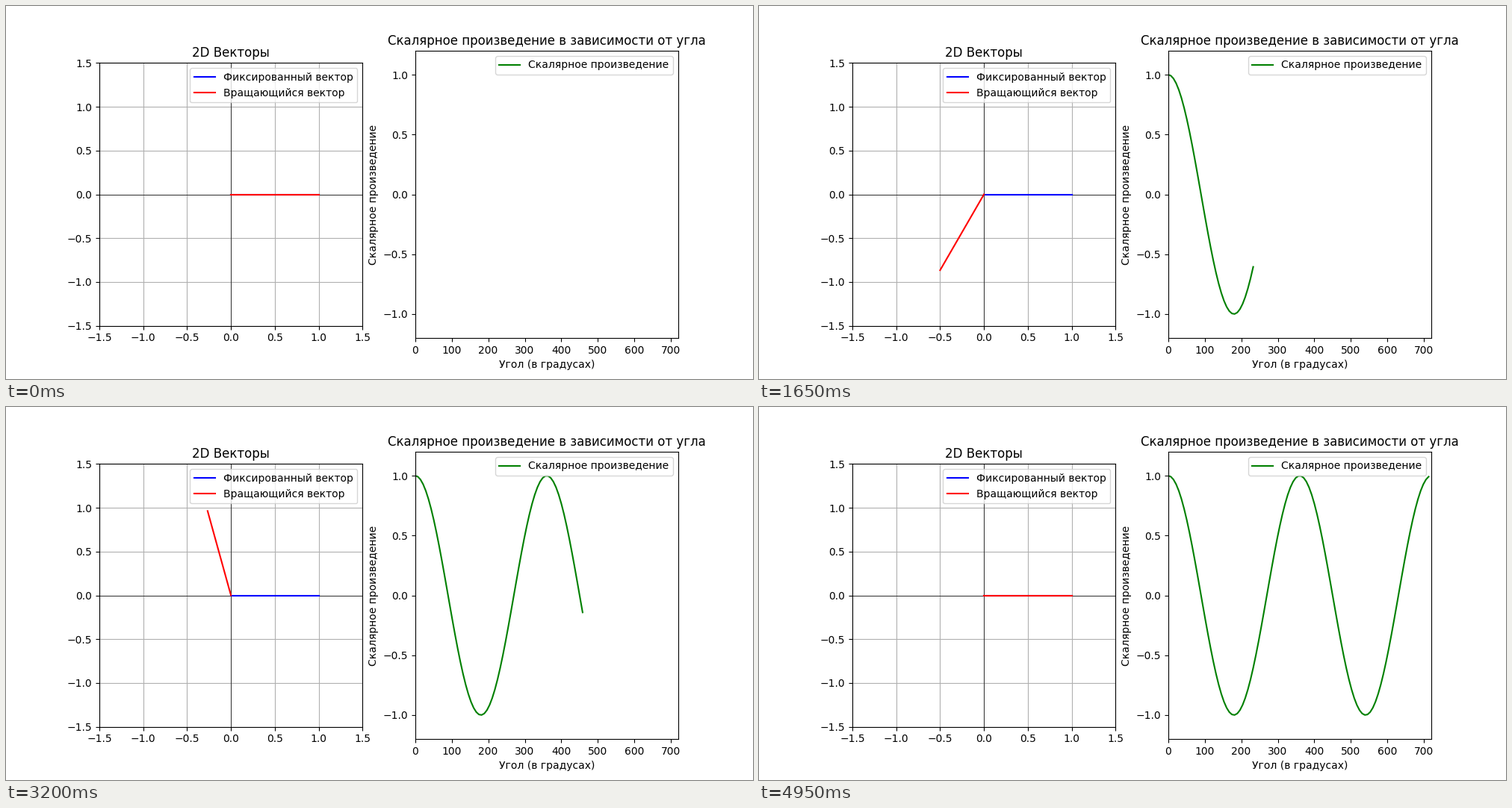
A matplotlib script for the animation above (5 s loop, 1000 by 500 pixels).

```python
import numpy as np
import matplotlib.pyplot as plt
from matplotlib.animation import FuncAnimation

FRAMES = 100
INTERVAL = 50

angles = np.linspace(0, 4 * np.pi, FRAMES)
degrees = np.degrees(angles)
products = np.cos(angles)

fig, (ax_vec, ax_dot) = plt.subplots(1, 2, figsize=(10, 5), dpi=100)

# Left panel: fixed and rotating unit vectors
ax_vec.set_xlim(-1.5, 1.5)
ax_vec.set_ylim(-1.5, 1.5)
ax_vec.set_aspect("equal")
ax_vec.grid(True)
ax_vec.axhline(0, color="black", linewidth=0.5)
ax_vec.axvline(0, color="black", linewidth=0.5)
ax_vec.set_title("2D Векторы")
ax_vec.plot([0, 1], [0, 0], color="blue", label="Фиксированный вектор")
rotating, = ax_vec.plot([0, 1], [0, 0], color="red", label="Вращающийся вектор")
ax_vec.legend(loc="upper right")

# Right panel: dot product against angle
ax_dot.set_xlim(0, 720)
ax_dot.set_ylim(-1.2, 1.2)
ax_dot.set_title("Скалярное произведение в зависимости от угла")
ax_dot.set_xlabel("Угол (в градусах)")
ax_dot.set_ylabel("Скалярное произведение")
curve, = ax_dot.plot([], [], color="green", label="Скалярное произведение")
ax_dot.legend(loc="upper right")


def update(frame):
    angle = angles[frame]
    rotating.set_data([0, np.cos(angle)], [0, np.sin(angle)])
    curve.set_data(degrees[:frame], products[:frame])
    return rotating, curve


anim = FuncAnimation(fig, update, frames=FRAMES, interval=INTERVAL,
                     repeat=True, repeat_delay=0)
plt.show()
```
